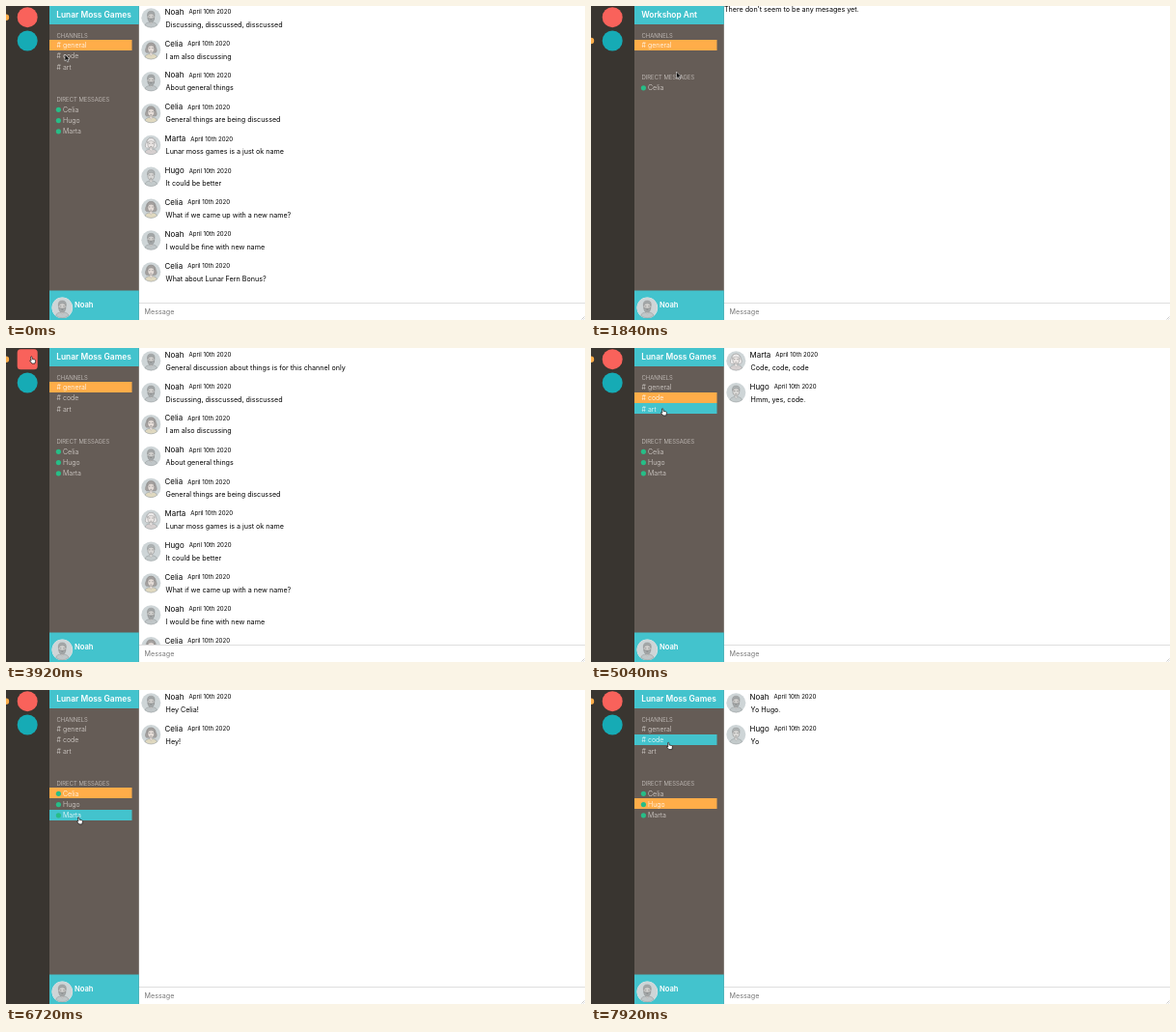
Write an HTML page that moves like this. It is 600 px wide and 325 px high and loops after 8000 ms.

```html
<!DOCTYPE html>
<html lang="en">
<head>
<meta charset="utf-8">
<title>Team chat</title>
<style>
  html, body { margin: 0; width: 100%; height: 100%; overflow: hidden; background: #fff; }
  svg { display: block; width: 100vw; height: 100vh; font: 7.15px Inter, "Open Sans", sans-serif; }
  .title { font-size: 8.4px; font-weight: 600; fill: #fff; }
  .label { font-size: 5.95px; font-weight: 300; fill: #d6d1cd; }
  .row { font-size: 7px; font-weight: 300; fill: #dcd7d3; }
  .lit { fill: #fff; }
  .name { font-size: 7.9px; }
  .date { font-size: 6.1px; }
</style>
</head>
<body>
<svg viewBox="0 0 600 325">
  <defs>
    <clipPath id="list"><rect x="138" width="462" height="307"/></clipPath>
  </defs>
  <rect width="600" height="325" fill="#fff"/>
  <g id="messages" clip-path="url(#list)"></g>
  <path d="M138 307.5H600" stroke="#dedede"/>
  <text x="143.6" y="318.7" fill="#777">Message</text>
  <path d="M596.5 324.5l3-3M598.5 324.5l1-1" stroke="#999" stroke-width=".5"/>
  <rect width="45" height="325" fill="#393530"/>
  <rect x="45" width="92.8" height="325" fill="#655c56"/>
  <path d="M45 0h92.8v19H45zM45 294.5h92.8V325H45z" fill="#43c3cd"/>
  <circle id="mark" r="3.2" fill="#ffad49"/>
  <rect id="games" x="11.7" y="1.2" width="21" height="21" fill="#f9625b"/>
  <rect id="bee" x="11.7" y="25.5" width="21" height="21" fill="#16abb5"/>
  <g id="sidebar"></g>
  <g id="me" transform="translate(58.3 312.3) scale(1.06)"></g>
  <text x="71" y="312.2" class="title" style="font-size:7.6px">Noah</text>
  <g id="cursor">
    <path id="arrow" d="M0 0V7L1.6 5.6 2.7 8 3.9 7.5 2.9 5.1H5z" fill="#111" stroke="#fff" stroke-width=".5"/>
    <path id="hand" d="M1.2 .6Q2 -.2 2.5 .7L2.8 3 5.3 3.5Q6.3 3.8 6.1 5L5.5 7.6H2.5L.3 5Q0 4.2 .7 4.2L1.6 4.8z" fill="#fff" stroke="#111" stroke-width=".7"/>
  </g>
</svg>
<script>
const $ = id => document.getElementById(id);
const LOOP = 8000, STEP = 80, ROW = 11.25, PITCH = 32.87;

const orgs = {
  games: { title: 'Lunar Moss Games', channels: ['general', 'code', 'art'], people: ['Celia', 'Hugo', 'Marta'] },
  bee: { title: 'Workshop Ant', channels: ['general'], people: ['Celia'] },
  loading: { title: '', channels: ['general'], people: [] }
};

const chats = {
  general: [
    ['Noah', 'General discussion about things is for this channel only'],
    ['Noah', 'Discussing, disscussed, disscussed'],
    ['Celia', 'I am also discussing'],
    ['Noah', 'About general things'],
    ['Celia', 'General things are being discussed'],
    ['Marta', 'Lunar moss games is a just ok name'],
    ['Hugo', 'It could be better'],
    ['Celia', 'What if we came up with a new name?'],
    ['Noah', 'I would be fine with new name'],
    ['Celia', 'What about Lunar Fern Bonus?']
  ],
  code: [['Marta', 'Code, code, code'], ['Hugo', 'Hmm, yes, code.']],
  art: [['Noah', 'Art, art, art'], ['Celia', 'Nice art.']],
  Celia: [['Noah', 'Hey Celia!'], ['Celia', 'Hey!']],
  Marta: [['Noah', 'Hey Marta!'], ['Marta', 'Hey!']],
  Hugo: [['Noah', 'Yo Hugo.'], ['Hugo', 'Yo']]
};

// time, organisation, selected row
const views = [
  [0, 'games', 'general'], [1360, 'bee', 'general'], [2320, 'bee', 'Celia'],
  [3280, 'bee', 'general'], [3760, 'loading', 'general'], [3920, 'games', 'general'],
  [4560, 'games', 'code'], [5280, 'games', 'art'], [6480, 'games', 'Celia'],
  [6880, 'games', 'Marta'], [7600, 'games', 'Hugo']
];

// time, x, y of the pointer tip
const path = [
  [0, 61, 50], [240, 20.5, 31], [320, 20.5, 31], [400, 20, 29.5], [720, 20, 29.5],
  [1200, 65.5, 47], [1280, 65.5, 47], [1840, 88.5, 68], [2080, 74, 82], [2480, 74, 82],
  [3120, 73.3, 40], [3360, 73.3, 40], [3760, 24.5, 8.5], [3920, 24.5, 8.5], [4400, 72.5, 50],
  [4720, 72.5, 50], [5040, 72.3, 62.3], [5280, 72.3, 62.3], [6080, 73, 106], [6400, 73, 106],
  [6720, 73.3, 131.3], [7040, 73.3, 131.3], [7360, 74, 117], [7680, 74, 117], [7920, 78.3, 54]
];
const gamesSquare = [[3520, 0], [3760, 1], [4080, 1], [4560, 0]];
const beeSquare = [[720, 0], [880, 1], [1040, 1], [1200, 0]];

function at(keys, t) {
  const i = keys.findIndex(k => k[0] > t);
  if (i < 0) return keys[keys.length - 1].slice(1);
  if (!i) return keys[0].slice(1);
  const a = keys[i - 1], b = keys[i];
  let u = (t - a[0]) / (b[0] - a[0]);
  u *= u * (3 - 2 * u);
  return a.slice(1).map((v, n) => v + (b[n + 1] - v) * u);
}

const text = (x, y, cls, s) => `<text x="${x}" y="${y}" class="${cls}">${s}</text>`;

// hair, shirt, skin, long hair, beard
const looks = {
  Noah: ['#a3a7a8', '#c0c6c8', '#d3d2d0', 0, 1],
  Celia: ['#a5a19f', '#e0d9c0', '#e6ddd8', 1, 0],
  Marta: ['#eeecec', '#d6d0d0', '#ebe6e4', 1, 0],
  Hugo: ['#aeb3b4', '#c3cacb', '#d9d8d6', 0, 0]
};

function avatar(who) {
  const [hair, shirt, skin, long, beard] = looks[who];
  return `<circle r="10" fill="#ced5d7"/>
    ${long ? `<path d="M-4.6 3.2Q-7 2-5-2.5-4.2-7 0-7T5-2.5Q7 2 4.6 3.2z" fill="${hair}" stroke="#8d8d8d" stroke-width=".5"/>` : ''}
    <path d="M-6.2 7.8Q-6 4.8 0 4.2 6 4.8 6.2 7.8A10 10 0 0 1-6.2 7.8" fill="${shirt}" stroke="#8f9496" stroke-width=".5"/>
    <path d="M-1.4 2h2.8v3L0 6.3-1.4 5z" fill="${skin}" stroke="#999" stroke-width=".3"/>
    <ellipse cy="-1.2" rx="3.4" ry="4.4" fill="${skin}" stroke="#858585" stroke-width=".5"/>
    <path d="M-3.7-1.8Q-4.5-7 0-7T3.7-1.8Q3-4.2 0-4.2T-3.7-1.8" fill="${hair}" stroke="#8a8a8a" stroke-width=".4"/>
    ${beard ? `<path d="M-3.4 0Q0 1.4 3.4 0 3.2 4.4 0 4.6-3.2 4.4-3.4 0" fill="${hair}" stroke="#858585" stroke-width=".4"/>` : ''}
    <path d="M-2.4-1.5h1.6M.8-1.5h1.6M-.9 1.7H.9" stroke="#777" stroke-width=".6"/>`;
}

function message([who, words], i) {
  return `<g transform="translate(0 ${i * PITCH})">
    <g transform="translate(150.3 13.2)">${avatar(who)}</g>
    <text x="164.6" y="9.7" class="name">${who}<tspan dx="5" dy="-.6" class="date">April 10th 2020</tspan></text>
    ${text(165.6, 22.7, '', words)}</g>`;
}

function layout(org) {
  const label = 35 + ROW * org.channels.length + 28.5;
  const rows = org.channels.map((name, i) => ({ name, y: 35 + ROW * i }));
  org.people.forEach((name, i) => rows.push({ name, y: label + 4.3 + ROW * i, person: true }));
  return { label, rows };
}

function row({ name, y, person }, selected, hovered) {
  const fill = name === selected ? '#ffad49' : name === hovered ? '#43c3cd' : '';
  const cls = fill ? 'row lit' : 'row', base = y + 8.2;
  return (fill ? `<rect x="45" y="${Math.floor(y)}" width="85.5" height="11" fill="${fill}"/>` : '') +
    (person
      ? `<circle cx="54.4" cy="${y + 5.8}" r="2.6" fill="#27bd87"/>` + text(59, base, cls, name)
      : text(52.6, base, cls, '# ' + name));
}

let lastSide, lastChat;
function draw(t) {
  const [, orgName, selected] = views.filter(v => v[0] <= t).pop();
  const org = orgs[orgName], { label, rows } = layout(org);
  const [x, y] = at(path, t);
  const live = t >= 1360;
  const hit = live && x > 45 && x < 131 && rows.find(r => y >= r.y && y < r.y + ROW);
  const hovered = hit ? hit.name : '';

  const side = [orgName, selected, hovered].join();
  if (side !== lastSide) {
    $('sidebar').innerHTML = text(52.2, 12, 'title', org.title) +
      text(52.5, 32.7, 'label', 'CHANNELS') +
      text(52.5, label + 1.7, 'label', 'DIRECT MESSAGES') +
      rows.map(r => row(r, selected, hovered)).join('');
    lastSide = side;
  }

  const scroll = live ? 0 : 33.8;
  const chat = [orgName === 'games', selected, scroll].join();
  if (chat !== lastChat) {
    $('messages').innerHTML = orgName === 'games'
      ? `<g transform="translate(0 ${-scroll})">${chats[selected].map(message).join('')}</g>`
      : text(138, 6.4, '', "There don't seem to be any mesages yet.");
    lastChat = chat;
  }

  $('mark').setAttribute('cy', live && t < 3760 ? 36 : 11.7);
  $('games').setAttribute('rx', 10.5 - 7 * at(gamesSquare, t)[0]);
  $('bee').setAttribute('rx', 10.5 - 7 * at(beeSquare, t)[0]);

  const onLogo = x > 11 && x < 33 && y < 47;
  $('cursor').setAttribute('transform', `translate(${x} ${y})`);
  $('hand').style.display = hit || onLogo ? '' : 'none';
  $('arrow').style.display = hit || onLogo ? 'none' : '';
}

$('me').innerHTML = '<circle r="10.2" fill="#eef1f1"/>' + avatar('Noah');
const start = performance.now();
function tick() {
  const t = (performance.now() - start) % LOOP;
  draw(Math.floor(t / STEP) * STEP);
  requestAnimationFrame(tick);
}
tick();
</script>
</body>
</html>
```
